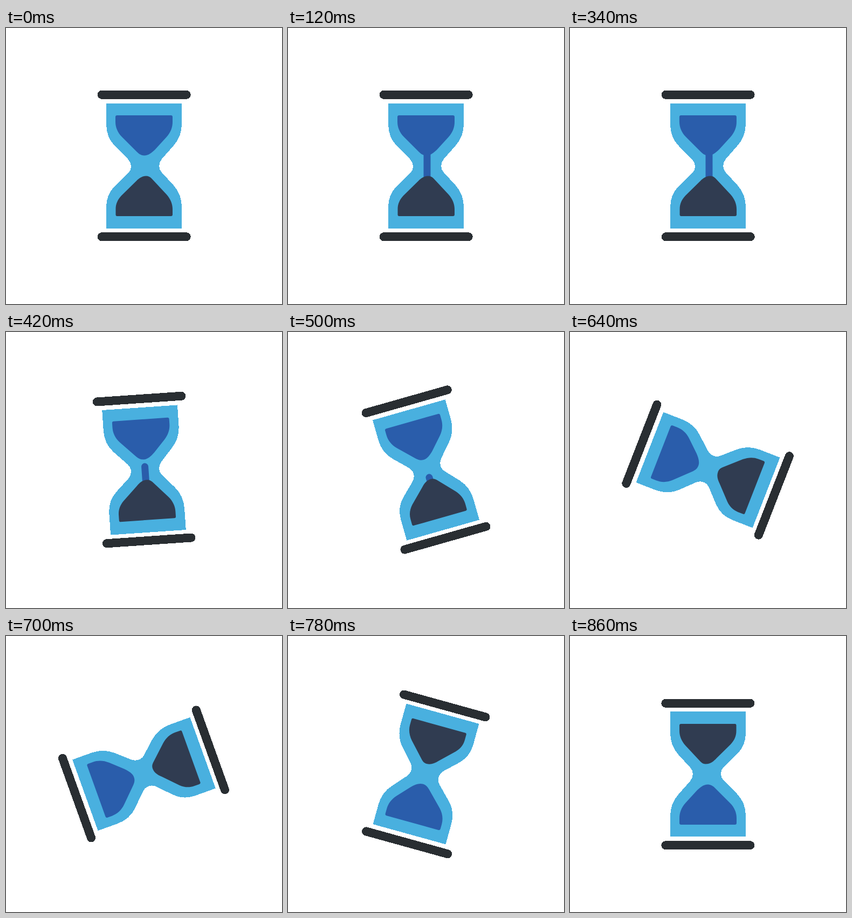
Animation of 512 by 512 pixels, one loop 960 ms. Source, as an HTML page:

```html
<!DOCTYPE html>
<html lang="en">
<head>
<meta charset="utf-8">
<title>Hourglass</title>
<style>
  html, body { margin: 0; width: 100%; height: 100%; overflow: hidden; background: #fff; }
  svg { display: block; width: 100vw; height: 100vh; }
</style>
</head>
<body>
<svg viewBox="0 0 512 512">
  <g id="hourglass">
    <g fill="#292e32" shape-rendering="crispEdges">
      <rect x="169.7" y="115.8" width="173" height="16" rx="8"/>
      <rect x="169.7" y="379.2" width="173" height="16" rx="8"/>
    </g>
    <path fill="#49b0df" shape-rendering="crispEdges" d="M186 140H326V178C326 193 321 207 311 218L289 243C282.5 251 282.5 261 289 268L311 292C321 303 326 317 326 332V372H186V332C186 317 191 304 202 293L226 270C234 262 234 251 226 243L202 219C191 208 186 194 186 178Z"/>
    <line id="stream" x1="258" x2="258" stroke="#2a5dab" stroke-width="13" stroke-linecap="round"/>
    <path fill="#2a5dab" d="M206 162H306Q309 162 309 165V174C309 185 305 194 298 202L277 225C271 231 264 236.5 257 236.5C251 236.5 247 234 243 230L215 202C207 194 203 184 203 174V165Q203 162 206 162Z"/>
    <path fill="#303c51" d="M206 349H306Q309 349 309 346V336C309 326 305 317 298 309L270 279C267 276 264 274.5 260 274.5C252 274.5 246 279 240 285.5L214 311C207.5 318 203.5 326 203.5 336V346Q203.5 349 206 349Z"/>
  </g>
</svg>
<script>
  const LOOP = 960, STEP = 20;
  const STREAM_TOP = 229, STREAM_BOTTOM = 283;
  const hourglass = document.getElementById('hourglass');
  const stream = document.getElementById('stream');

  const progress = (t, from, to) => Math.min(1, Math.max(0, (t - from) / (to - from)));
  const streamY = p => STREAM_TOP + (STREAM_BOTTOM - STREAM_TOP) * p;

  // Equivalent of cubic-bezier(x1, 0, x2, 1), solved by bisection
  function ease(x, x1, x2) {
    let low = 0, high = 1;
    for (let i = 0; i < 30; i++) {
      const s = (low + high) / 2, r = 1 - s;
      if (3 * r * r * s * x1 + 3 * r * s * s * x2 + s ** 3 < x) low = s;
      else high = s;
    }
    return low * low * (3 - 2 * low);
  }

  function draw(t) {
    const angle = -180 * ease(progress(t, 330, 850), 0.718, 0.708);
    hourglass.setAttribute('transform', `rotate(${angle} 256 256)`);

    const head = progress(t, 0, 120), tail = progress(t, 340, 546);
    stream.setAttribute('y1', streamY(tail));
    stream.setAttribute('y2', streamY(head));
    stream.style.display = head > 0 && tail < 1 ? '' : 'none';
  }

  const start = performance.now();
  function tick() {
    const elapsed = performance.now() - start + 1;
    draw(Math.floor(elapsed / STEP) * STEP % LOOP);
    requestAnimationFrame(tick);
  }
  tick();
</script>
</body>
</html>
```
